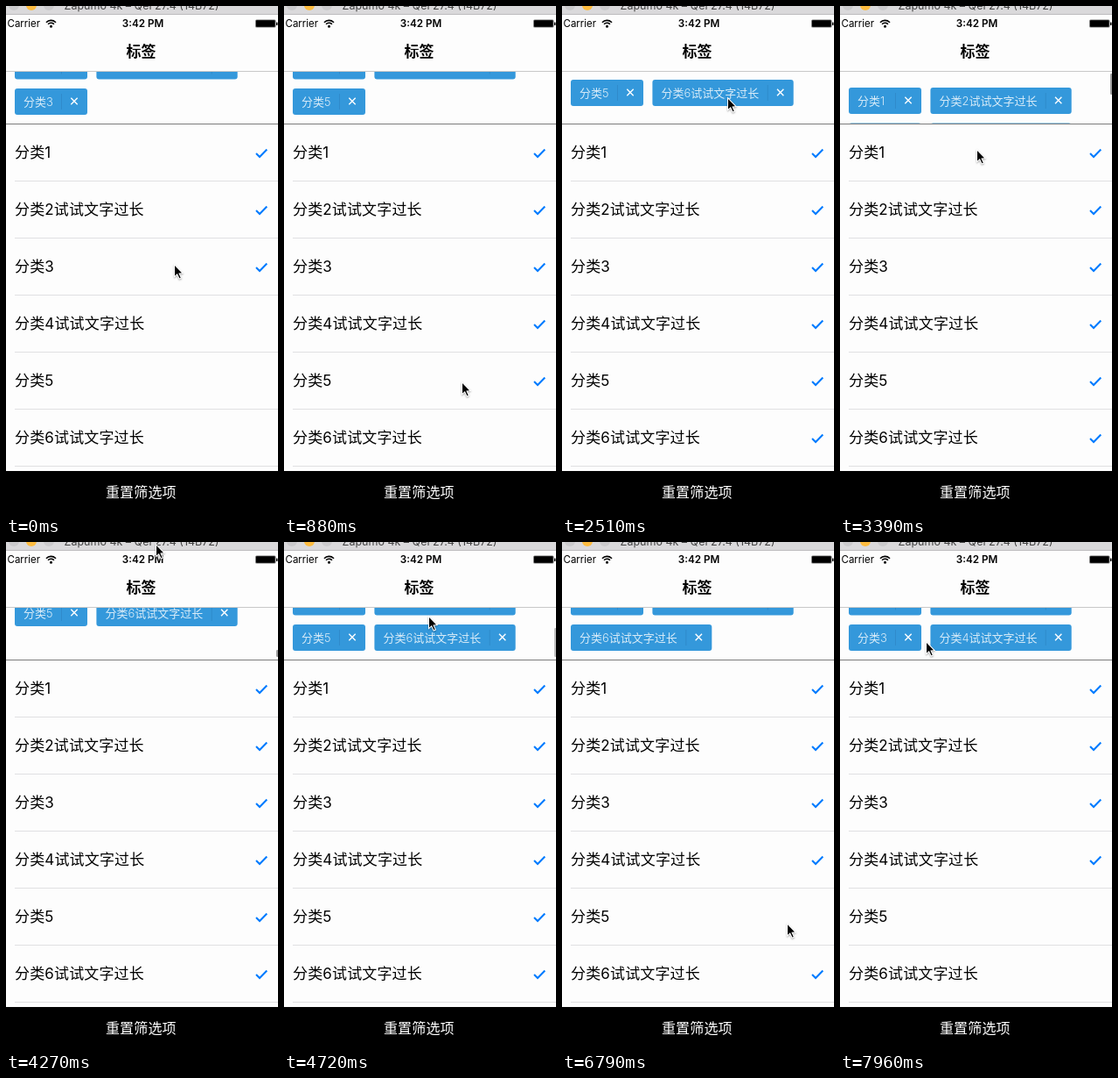
Write an HTML page with a canvas that moves like this. It is 311 px wide and 579 px high and loops after 8000 ms.

```html
<!DOCTYPE html>
<html lang="zh-CN">
<head>
<meta charset="utf-8">
<title>标签</title>
<style>
html, body { margin: 0; width: 100%; height: 100%; overflow: hidden; background: #fff; }
canvas { display: block; width: 100vw; height: 100vh; }
</style>
</head>
<body>
<canvas id="stage"></canvas>
<script>
const W = 311, H = 579, LOOP = 8000, STEP = 147.4;
const FONT = 'Inter, "Noto Sans CJK SC", "Noto Sans CJK", sans-serif';
const BLUE = '#3498db';
const TAG_PITCH = 40.4, ROW_PITCH = 65;
const RELEASE = 32; // step at which the last drag has settled

const canvas = document.getElementById('stage');
const ctx = canvas.getContext('2d');
const ratio = window.devicePixelRatio || 1;
canvas.width = Math.round(W * ratio);
canvas.height = Math.round(H * ratio);

const clamp = (v, lo = 0, hi = 1) => Math.min(hi, Math.max(lo, v));
const smooth = p => p * p * (3 - 2 * p);
const maxScroll = rows => (rows - 1) * TAG_PITCH - 10;

// Stops are { step, values }; the motion eases from one to the next.
const stop = (step, ...values) => ({ step, values });
const pointerStops = [
  stop(0, 192, 294),
  stop(6, 203, 428),
  stop(9, 205, 483),
  stop(17, 189, 104),
  stop(23, 156, 163),
  stop(25, 158, 112),
  stop(29, 171, 2),
  stop(RELEASE, 165, 84),
  stop(38, 75, 106),
  stop(45, 267, 424),
  stop(49, 203, 490),
  stop(54, 98, 113)
];
const scrollStops = [
  stop(2, maxScroll(2)),
  stop(6, maxScroll(3)),
  stop(9, maxScroll(3)),
  stop(11, maxScroll(3) + 10),
  stop(18, maxScroll(3) + 10),
  stop(23, -9),
  stop(25, 0),
  stop(29, maxScroll(3) + 28),
  stop(RELEASE, maxScroll(3))
];

const tags = [1, 2, 3, 4, 5, 6].map(n => ({
  name: '分类' + n + (n % 2 ? '' : '试试文字过长'),
  width: n % 2 ? 83 : 161.3,
  from: 0,
  to: Infinity
}));
tags[3].from = 3;
Object.assign(tags[4], { from: 5, to: 39 });
Object.assign(tags[5], { from: 9, to: 50 });

function sample(stops, k) {
  const next = stops.findIndex(s => s.step > k);
  if (next === 0) return stops[0].values;
  if (next < 0) return stops[stops.length - 1].values;
  const a = stops[next - 1], b = stops[next];
  const p = smooth((k - a.step) / (b.step - a.step));
  return a.values.map((v, i) => v + (b.values[i] - v) * p);
}

function rect(x, y, w, h, color, r = 0) {
  ctx.fillStyle = color;
  ctx.beginPath();
  ctx.roundRect(x, y, w, h, r);
  ctx.fill();
}

function disc(x, y, r, color) {
  ctx.fillStyle = color;
  ctx.beginPath();
  ctx.arc(x, y, r, 0, Math.PI * 2);
  ctx.fill();
}

function line(points, color, width) {
  ctx.strokeStyle = color;
  ctx.lineWidth = width;
  ctx.beginPath();
  points.forEach(([x, y]) => ctx.lineTo(x, y));
  ctx.stroke();
}

function text(str, x, y, size, color, { weight = 400, align = 'left', spacing = 0 } = {}) {
  ctx.font = `${weight} ${size}px ${FONT}`;
  ctx.letterSpacing = spacing + 'px';
  ctx.fillStyle = color;
  ctx.textAlign = align;
  ctx.fillText(str, x, y);
}

function drawWindowBar() {
  rect(0, 0, W, 10, '#dad9db');
  rect(0, 9, W, 1, '#bcbbbd');
  ['#cbcacc', '#fdbc40', '#cbcacc'].forEach((color, i) => disc(9 + 20 * i, -1, 6, color));
  text('Zapumo 4k – Qel 27.4 (14B72)', 155, 3.5, 12.5, '#444', { align: 'center' });
}

function drawStatus() {
  text('Carrier', 1.5, 24.3, 11.5, '#000');
  text('3:42 PM', 156.5, 24.3, 11.7, '#000', { weight: 600, align: 'center' });
  ctx.strokeStyle = '#000';
  ctx.lineWidth = 1.6;
  for (const r of [4.7, 7.6]) {
    ctx.beginPath();
    ctx.arc(51.5, 24, r, -Math.PI * 0.76, -Math.PI * 0.24);
    ctx.stroke();
  }
  disc(51.5, 23.2, 1.5, '#000');
  rect(285, 15.5, 23.5, 9, '#777', 1.5);
  rect(286, 16.3, 21.5, 7.4, '#000', 0.6);
  rect(309, 18.5, 1.5, 3.5, '#000', 0.6);
}

function drawTag({ name, width }, x, y) {
  rect(x, y, width, 30, BLUE, 3);
  text(name, x + 10, y + 19.7, 13, '#d9ecf8', { weight: 300 });
  rect(x + width - 30, y + 6, 1, 18, '#2f8acb');
  const cx = x + width - 15, cy = y + 14.5, d = 3.7;
  for (const s of [-d, d]) line([[cx - d, cy - s], [cx + d, cy + s]], '#fff', 1.4);
}

function drawTags(chosen, scroll) {
  ctx.save();
  ctx.beginPath();
  ctx.rect(0, 74, W, 60);
  ctx.clip();
  let x;
  chosen.forEach((tag, i) => {
    if (i % 2 === 0) x = 10;
    drawTag(tag, x, 84 - scroll + TAG_PITCH * (i >> 1));
    x += tag.width + 10.4;
  });
  ctx.restore();
}

// The bar shrinks as the tags are pulled past either end.
function drawScrollBar(max, scroll, k) {
  if (k < 19 || k > 34) return;
  const over = Math.max(0, -scroll, scroll - max);
  const h = Math.max(8, 33 - over);
  ctx.globalAlpha = clamp((34 - k) / 3);
  rect(309, 77 + (54 - h) * clamp(scroll / max), 3, h, '#9a9a9a', 1.2);
  ctx.globalAlpha = 1;
}

function drawList(chosen) {
  tags.forEach((tag, i) => {
    const y = 167 + ROW_PITCH * i;
    text(tag.name, 10, y + 6.3, 17, '#000', { spacing: 0.15 });
    rect(10, y + 32, W - 10, 1, '#e0e0e2');
    if (chosen.includes(tag)) {
      line([[286, y + 1], [290, y + 5], [298.3, y - 3.5]], '#007aff', 2);
    }
  });
}

function drawPointer(x, y) {
  ctx.save();
  ctx.translate(x, y);
  ctx.beginPath();
  [[1, 2], [1, 13.5], [3.9, 10.9], [6.4, 16.3], [7.7, 15.7], [5.3, 10.4], [9, 10.2]]
    .forEach(([px, py]) => ctx.lineTo(px, py));
  ctx.closePath();
  ctx.shadowColor = 'rgba(0,0,0,.35)';
  ctx.shadowBlur = 2 * ratio;
  ctx.shadowOffsetY = ratio;
  ctx.strokeStyle = '#fff';
  ctx.lineWidth = 2;
  ctx.stroke();
  ctx.shadowColor = 'transparent';
  ctx.fillStyle = '#000';
  ctx.fill();
  ctx.restore();
}

function draw(k) {
  const chosen = tags.filter(tag => k >= tag.from && k < tag.to);
  const max = maxScroll(Math.ceil(chosen.length / 2));
  const scroll = k < RELEASE ? sample(scrollStops, k)[0] : max;

  ctx.setTransform(ratio, 0, 0, ratio, 0, 0);
  rect(0, 0, W, H, '#fdfdfd');
  drawTags(chosen, scroll);
  drawScrollBar(max, scroll, k);
  drawWindowBar();
  drawStatus();
  text('标签', 154.5, 58.2, 17, '#000', { weight: 600, align: 'center' });
  rect(0, 74, W, 1, '#c8c8c8');
  rect(0, 134, W, 1, '#7c7c7c');
  drawList(chosen);
  rect(0, 530, W, H - 530, '#000');
  text('重置筛选项', 154.3, 560, 16, '#fff', { align: 'center', spacing: 0.15 });
  drawPointer(...sample(pointerStops, k));
}

// The screen refreshes in even, visible steps.
const start = performance.now();
function tick() {
  const t = (performance.now() - start) % LOOP;
  draw(Math.floor((t + 6) / STEP));
  requestAnimationFrame(tick);
}
tick();
</script>
</body>
</html>
```
